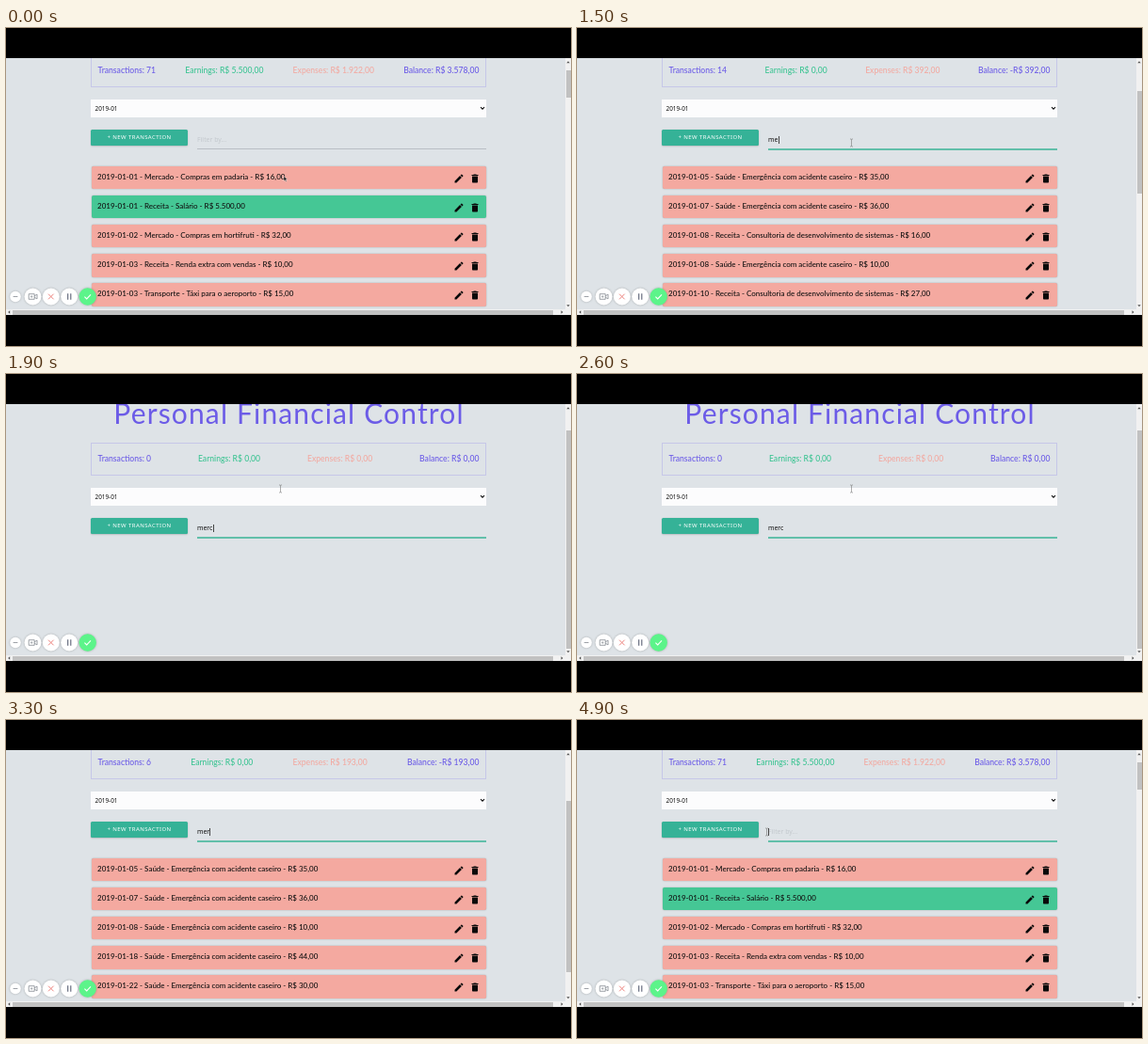
Animation of 600 by 338 pixels, one loop 5 s. Source, as an HTML page:

```html
<!DOCTYPE html>
<html lang="en">
<head>
<meta charset="utf-8">
<title>Personal Financial Control</title>
<style>
  html, body { margin: 0; width: 100%; height: 100%; overflow: hidden; background: #000; }
  #stage { position: relative; width: 600px; height: 338px; overflow: hidden; background: #000; }
  #stage div, #stage svg { position: absolute; box-sizing: border-box; white-space: nowrap; }
  #view { left: 0; top: 32px; width: 594px; height: 267px; overflow: hidden; background: #dee3e7; }
  #page { left: 0; top: -32px; width: 594px; height: 400px; }
  #title { left: 0; top: -24px; width: 601px; height: 40px; text-align: center;
    font: 30px/40px Lato, sans-serif; letter-spacing: 1.15px; color: #6c5ce7; }
  #stats { left: 90px; top: 28px; width: 420px; height: 34.5px; padding: 0 6.5px;
    border: 1px solid #c6c7e8; display: flex; justify-content: space-between;
    font: 500 8.6px/32px Lato, sans-serif; color: #6c5ce7; }
  #stats .earn { color: #3dc493; }
  #stats .cost { color: #f2aaa2; }
  #month { left: 90px; top: 76px; width: 420px; height: 19px; padding-left: 4.5px; background: #fcfcfd;
    font: 500 6.4px/19px "Noto Sans", sans-serif; color: #111; }
  #add { left: 90px; top: 108px; width: 103px; height: 17px; border-radius: 1.5px; text-align: center;
    background: #35b297; color: #fff; font: 500 6px/17px "Noto Sans", sans-serif; letter-spacing: .42px;
    box-shadow: 0 .5px 1.5px rgba(0,0,0,.25); }
  #filter { left: 203px; top: 112px; width: 307px; height: 14px; font: 6.9px/14px "Noto Sans", sans-serif; color: #111; }
  #filter.blank { color: #c3c8cd; }
  #caret { top: 115px; width: 1px; height: 8px; background: #444; }
  #line { left: 203px; top: 128px; width: 307px; height: 1px; background: #b9bec4; }
  #focus { left: 203px; top: 128px; width: 307px; height: 2px; background: #62bfaa; }
  #rows { left: 0; top: 0; width: 594px; height: 400px; }
  #rows .row { left: 90.5px; width: 419px; height: 24.6px; padding-left: 6.5px; border-radius: 2px; background: #f4a9a0;
    font: 500 8px/23.4px Lato, sans-serif; color: #111; box-shadow: 0 0 1.5px rgba(90,90,90,.55); }
  #rows .in { background: #45c795; }
  #rows svg { width: 12px; height: 12px; top: 7px; fill: #0a0a0a; }
  .bar { background: #f1f1f1; }
  .thumb { background: #c1c1c1; }
</style>
</head>
<body>
<div id="stage">
  <div id="view">
    <div id="page">
      <div id="title">Personal Financial Control</div>
      <div id="stats"><span></span><span class="earn"></span><span class="cost"></span><span></span></div>
      <div id="month">2019-01</div>
      <svg style="left:503px;top:83px" width="6" height="5"><path d="M1 1.2 3 3.2 5 1.2" fill="none" stroke="#111" stroke-width="1.1"/></svg>
      <div id="add">+ NEW TRANSACTION</div>
      <div id="filter"></div>
      <div id="caret"></div>
      <div id="line"></div>
      <div id="focus"></div>
      <div id="rows"></div>
    </div>
  </div>

  <div class="bar" style="left:594px;top:32px;width:6px;height:267px"></div>
  <div class="thumb" id="thumb" style="left:594.5px;width:5px"></div>
  <div class="bar" style="left:0;top:299px;width:600px;height:6px"></div>
  <div class="thumb" style="left:6.5px;top:299.5px;width:574px;height:5px"></div>

  <svg width="600" height="338" viewBox="0 0 600 338" style="left:0;top:0">
    <g fill="#505050">
      <path d="M595.3 37.2h3.4l-1.7-2z"/>
      <path d="M595.3 294.2h3.4l-1.7 2z"/>
      <path d="M4.2 300.3v3.4l-2-1.7z"/>
      <path d="M589.5 300.3v3.4l2-1.7z"/>
    </g>
    <g style="filter:drop-shadow(0 .5px 1px rgba(0,0,0,.25))">
      <g fill="#fff">
        <circle cx="10" cy="285.5" r="5.8"/>
        <circle cx="28.5" cy="285.5" r="9"/>
        <circle cx="47.8" cy="285.5" r="9"/>
        <circle cx="67.2" cy="285.5" r="9"/>
      </g>
      <circle cx="86.7" cy="285.5" r="9.2" fill="#5cf48a"/>
    </g>
    <g fill="none" stroke="#858a91" stroke-width=".8">
      <path d="M7.6 285.5h4.8"/>
      <path d="M24.2 282.7h6v5.6h-6zM30.2 284.8l2.8-1.7v4.8l-2.8-1.7"/>
      <circle cx="27.2" cy="285.5" r=".7"/>
      <path d="M45 282.7l5.6 5.6M50.6 282.7l-5.6 5.6" stroke="#ee8580" stroke-width="1"/>
      <path d="M65.7 282.3v6.4M68.8 282.3v6.4" stroke="#5a6074" stroke-width="1.1"/>
      <path d="M83.4 285.7l2.3 2.2 4.3-4.6" stroke="#fff" stroke-width="1.1"/>
    </g>
    <path id="arrow" d="M0 0v5l1.2-1.1.9 1.8.9-.4-.9-1.8h1.6z" fill="#111" stroke="#fff" stroke-width=".4"/>
    <path id="beam" d="M-1.5-4H-.4L0-3.6.4-4H1.5M0-3.6V3.6M-1.5 4H-.4L0 3.6.4 4H1.5" fill="none" stroke="#777" stroke-width=".6"/>
  </svg>
</div>

<script>
const $ = id => document.getElementById(id);
const LOOP = 5000, TICK = 100;

const food = 'Mercado - Compras em ';
const health = 'Saúde - Emergência com acidente caseiro';
const consult = 'Receita - Consultoria de desenvolvimento de sistemas';
const extra = 'Receita - Renda extra com vendas';

// Each row: day, text, amount, income flag
const states = {
  '': { sums: ['71', 'R$ 5.500,00', 'R$ 1.922,00', 'R$ 3.578,00'], thumb: [45, 74], rows: [
    ['01', food + 'padaria', '16,00'], ['01', 'Receita - Salário', '5.500,00', true],
    ['02', food + 'hortifruti', '32,00'], ['03', extra, '10,00'],
    ['03', 'Transporte - Táxi para o aeroporto', '15,00']] },
  m: { sums: ['57', 'R$ 0,00', 'R$ 1.569,00', '-R$ 1.569,00'], thumb: [47, 82], rows: [
    ['01', food + 'padaria', '16,00'], ['02', food + 'hortifruti', '32,00'], ['03', extra, '10,00'],
    ['04', food + 'hortifruti', '24,00'], ['05', food + 'hortifruti', '27,00']] },
  me: { sums: ['14', 'R$ 0,00', 'R$ 392,00', '-R$ 392,00'], thumb: [67, 176], rows: [
    ['05', health, '35,00'], ['07', health, '36,00'], ['08', consult, '16,00'],
    ['08', health, '10,00'], ['10', consult, '27,00']] },
  mer: { sums: ['6', 'R$ 0,00', 'R$ 193,00', '-R$ 193,00'], thumb: [86, 268], rows: [
    ['05', health, '35,00'], ['07', health, '36,00'], ['08', health, '10,00'],
    ['18', health, '44,00'], ['22', health, '30,00']] },
  merc: { sums: ['0', 'R$ 0,00', 'R$ 0,00', 'R$ 0,00'], thumb: [60, 292], rows: [], shift: 45 }
};
const typed = [[0, ''], [1100, 'm'], [1500, 'me'], [1700, 'mer'], [1900, 'merc'],
  [3300, 'mer'], [3800, 'me'], [4000, 'm'], [4400, '']];
const caretOn = [[700, 2400], [2900, 4100], [4400, 5000]];
const labels = ['Transactions', 'Earnings', 'Expenses', 'Balance'];

const icon = (left, d) => `<svg viewBox="0 0 24 24" style="left:${left}px"><path d="${d}"/></svg>`;
const icons =
  icon(384, 'M3 17.25V21h3.75L17.81 9.94l-3.75-3.75zM20.71 7.04c.39-.39.39-1.02 0-1.41l-2.34-2.34c-.39-.39-1.02-.39-1.41 0l-1.83 1.83 3.75 3.75z') +
  icon(401, 'M6 19c0 1.1.9 2 2 2h8c1.1 0 2-.9 2-2V7H6zM19 4h-3.5l-1-1h-5l-1 1H5v2h14z');

const clamp = x => Math.max(0, Math.min(1, x));
const ease = x => x * x * (3 - 2 * x);
const during = (t, a, b) => t >= a && t < b;

let current = null;
function show(word) {
  if (word === current) return;
  current = word;
  const { sums, thumb, rows, shift = 0 } = states[word];
  [...$('stats').children].forEach((el, i) => { el.textContent = `${labels[i]}: ${sums[i]}`; });
  $('rows').innerHTML = rows.map(([day, text, sum, income], i) =>
    `<div class="row${income ? ' in' : ''}" style="top:${146.5 + i * 31.2}px">2019-01-${day} - ${text} - R$ ${sum}${icons}</div>`).join('');
  $('filter').innerHTML = `<span>${word}</span>${word ? '' : 'Filter by...'}`;
  $('filter').className = word ? '' : 'blank';
  $('caret').style.left = 203.2 + $('filter').firstChild.getBoundingClientRect().width + 'px';
  $('page').style.top = shift - 32 + 'px';
  $('thumb').style.top = thumb[0] + 'px';
  $('thumb').style.height = thumb[1] - thumb[0] + 'px';
}

function place(id, visible, x, y) {
  $(id).setAttribute('visibility', visible ? 'visible' : 'hidden');
  $(id).setAttribute('transform', `translate(${x} ${y})`);
}

function draw(t) {
  show(typed.filter(([at]) => at <= t).pop()[1]);
  $('caret').style.opacity = caretOn.some(([a, b]) => during(t, a, b)) ? 1 : 0;
  $('focus').style.opacity = clamp((t - 700) / 300);

  const p = ease(clamp((t - 100) / 500));
  const x = 295 - 4 * p, y = 157.5 - 35.5 * p;
  const overField = y < 130;
  place('arrow', !overField, x, y);
  if (t >= 4700) place('beam', true, 201.5, 119);
  else place('beam', overField && t < 2800, x + .5, y);
}

const start = performance.now();
function frame() {
  const t = (performance.now() - start) % LOOP;
  draw(Math.floor(t / TICK) * TICK);
  requestAnimationFrame(frame);
}
frame();
</script>
</body>
</html>
```
